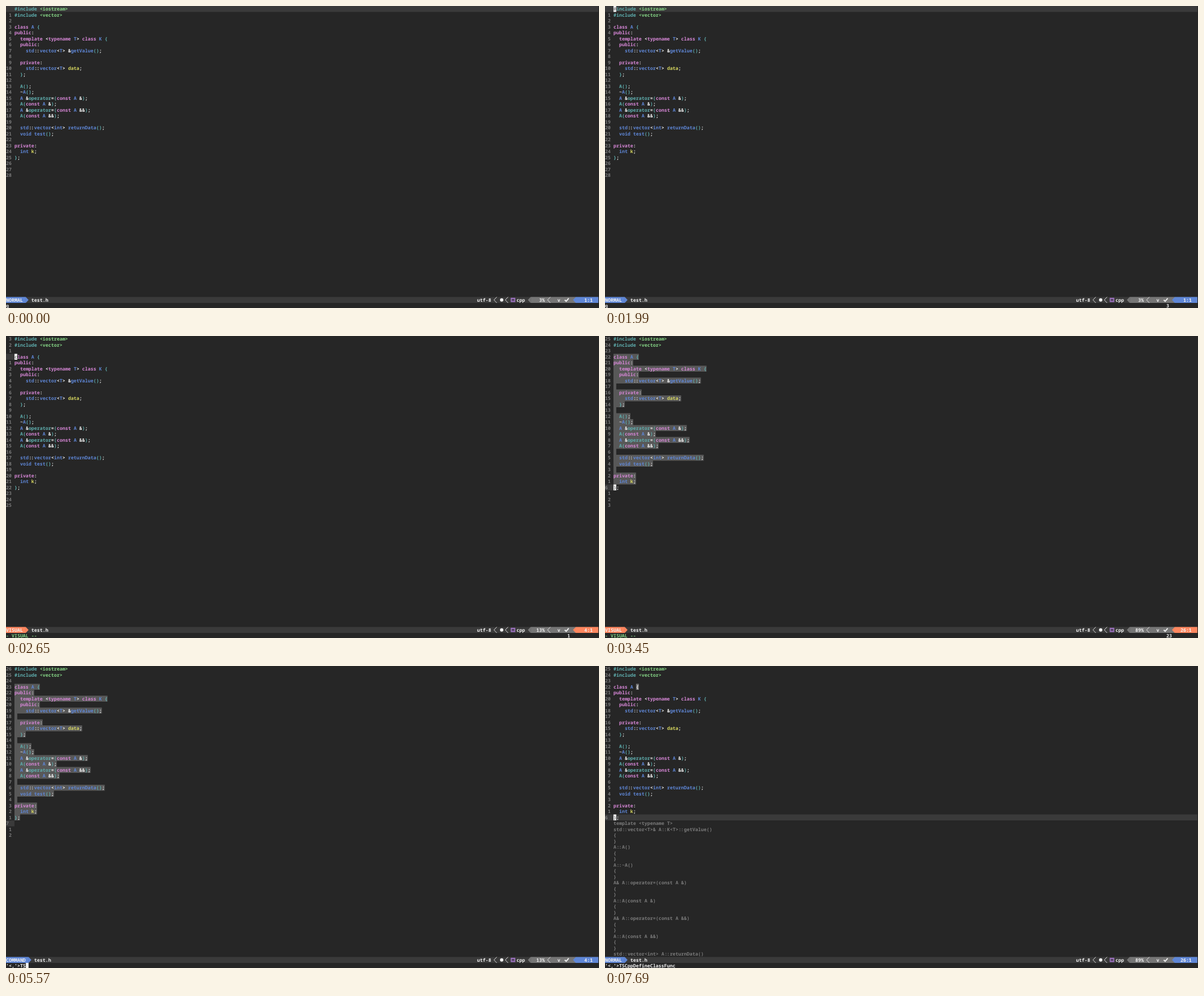
Animation, 1048 px wide and 534 px high, one loop 8000 ms. Source, as an HTML page:

```html
<!DOCTYPE html>
<html lang="en">
<head>
<meta charset="utf-8">
<title>Editor session</title>
<style>
  html, body { margin: 0; width: 100%; height: 100%; overflow: hidden; background: #262626; }
  svg { display: block; width: 1048px; height: 534px; }
  text { font: 600 8.308px "Noto Sans Mono", "DejaVu Sans Mono", monospace; text-rendering: geometricPrecision; font-variant-ligatures: none; }
</style>
</head>
<body>
<svg id="screen" viewBox="0 0 1048 534"></svg>
<script>
const W = 4.985, H = 10.5, COLS = 210, GUTTER = 3, STATUS = 49, CMD = 50, LOOP = 8000;
const C = {
  bg: '#262626', bar: '#3a3a3a', sel: '#585858', grey: '#767676', dim: '#7a7a7a', white: '#f0f0f0',
  blue: '#5f87d7', orange: '#ff875f', green: '#87d787', teal: '#5fafaf', pink: '#d787d7', yellow: '#d7d75f',
  purple: '#a074c4', menu: '#b2b2b2', covered: '#8a8a8a'
};

const source = `#include <iostream>
#include <vector>

class A {
public:
  template <typename T> class K {
  public:
    std::vector<T> &getValue();

  private:
    std::vector<T> data;
  };

  A();
  ~A();
  A &operator=(const A &);
  A(const A &);
  A &operator=(const A &&);
  A(const A &&);

  std::vector<int> returnData();
  void test();

private:
  int k;
};


`.split('\n');

const preview = ['template <typename T>'].concat([
  'std::vector<T>& A::K<T>::getValue()', 'A::A()', 'A::~A()', 'A& A::operator=(const A &)',
  'A::A(const A &)', 'A& A::operator=(const A &&)', 'A::A(const A &&)'
].flatMap(s => [s, '{', '}']), 'std::vector<int> A::returnData()');

const menu = ['TSCppDefineClassFunc', 'TSCppMakeConcreteClass', 'TSCppRuleOf3', 'TSCppRuleOf5'];
const range = "'<,'>";

// Each step overrides part of the state before it.
const steps = [
  [0, { mode: 'NORMAL', row: 0, pos: 0, cursor: false, cmd: 'q', count: '', menu: false, preview: false }],
  [650, { cursor: true }],
  [1910, { count: '3' }],
  [2040, { row: 3, pos: 3, count: '' }],
  [2650, { mode: 'VISUAL', cmd: '- VISUAL --', count: '1' }],
  [3250, { count: '2' }],
  [3350, { count: '22' }],
  [3450, { row: 25, pos: 25, count: '23' }],
  [4780, { row: 26, pos: 26, count: '24' }],
  [5240, { mode: 'COMMAND', pos: 3, cmd: range, count: '' }],
  [5370, { cmd: range + 'T' }],
  [5570, { cmd: range + 'TS' }],
  [5900, { cmd: range + 'TSC' }],
  [6030, { cmd: range + 'TSCp' }],
  [6240, { menu: true }],
  [6300, { cmd: range + menu[0] }],
  [7690, { mode: 'NORMAL', row: 25, pos: 25, menu: false, preview: true }]
];

const screen = document.getElementById('screen');

function add(tag, attrs, content = '') {
  const el = document.createElementNS('http://www.w3.org/2000/svg', tag);
  for (const key in attrs) el.setAttribute(key, attrs[key]);
  el.textContent = content;
  screen.append(el);
}

const box = (col, row, cols, fill, rows = 1) =>
  add('rect', { x: col * W, y: row * H, width: cols * W, height: rows * H, fill });

function put(col, row, str, fill) {
  const tight = str === '::';
  add('text', {
    x: col * W + (tight ? 0.5 : 0), y: row * H + 8.1, fill,
    'letter-spacing': tight ? -1 : 0
  }, str);
}

// A chevron as tall as the status row: filled, or a thin line when fill is 'none'.
function chevron(base, tip, fill) {
  const top = STATUS * H, line = fill === 'none';
  add('path', {
    d: `M${base * W} ${top}L${tip * W} ${top + H / 2}L${base * W} ${top + H}`,
    fill, stroke: line ? C.white : 'none', 'stroke-width': 0.9
  });
}

function tint(token, line, at) {
  if (/^<(iostream|vector)>$/.test(token)) return C.green;
  if (/^(class|public|private|template|typename|const)$/.test(token)) return C.pink;
  if (/^(#include|operator|[(){}])$/.test(token)) return C.teal;
  if (/^(data|k)$/.test(token)) return C.yellow;
  if (at === 2 && line.startsWith('  A(')) return C.teal;
  return /\w/.test(token) ? C.blue : C.white;
}

function code(row, line, fill) {
  for (const m of line.matchAll(/#include|<(?:iostream|vector)>$|\w+|::|[(){}]|[^\s\w(){}:]+|:/g))
    put(GUTTER + m.index, row, m[0], fill || tint(m[0], line, m.index));
}

function block(col, row, char = '') {
  box(col, row, 1, C.white);
  put(col, row, char, C.covered);
}

// One path for all rows, so that no seams show between them.
function drawSelection(from, to) {
  const d = source.slice(from, to).map((line, i) => {
    const width = (line.length || 1) * W;
    return `M${GUTTER * W} ${(from + i) * H}h${width}v${H}h${-width}z`;
  });
  add('path', { d: d.join(''), fill: C.sel });
}

function drawBuffer(s) {
  const normal = s.mode === 'NORMAL';
  const last = s.preview ? 25 : 28;
  box(0, s.row, normal ? COLS : GUTTER, C.bar);
  if (!normal) drawSelection(3, s.row);
  for (let row = 0; row <= last; row++) {
    const away = String(Math.abs(row - s.row));
    // The left edge of the gutter is cut off, so the current number loses a digit.
    if (row === s.row) put(0, row, String(row + 1).slice(1), C.dim);
    else put(2 - away.length, row, away, C.dim);
    code(row, source[row]);
  }
  if (s.preview) {
    preview.forEach((line, i) => code(26 + i, line, C.dim));
    box(GUTTER + 8, 3, 1, C.grey);
    put(GUTTER + 8, 3, '{', C.white);
  }
  if (s.cursor && s.mode !== 'COMMAND') block(GUTTER, s.row, source[s.row][0]);
}

function drawStatus(s) {
  const accent = s.mode === 'VISUAL' ? C.orange : C.blue;
  const end = s.mode.length + 1, y = STATUS * H;
  const percent = Math.floor((s.pos + 1) / source.length * 100) + '%';
  const place = s.pos + 1 + ':1';

  box(0, STATUS, COLS, C.bar);
  box(0, STATUS, end, accent);
  chevron(end, end + 1, accent);
  put(0, STATUS, s.mode, C.white);
  put(end + 2, STATUS, 'test.h', C.white);

  put(167, STATUS, 'utf-8', C.white);
  chevron(174, 173, 'none');
  add('circle', { cx: 876, cy: y + 5.2, r: 3, fill: C.white });
  chevron(178, 177, 'none');
  add('rect', { x: 892, y: y + 1.5, width: 8, height: 7.5, fill: C.purple });
  add('path', { d: `M894.5 ${y + 3}v4.4M897.5 ${y + 3}v4.4M894.5 ${y + 5.2}h3`, stroke: C.bg, fill: 'none' });
  put(181, STATUS, 'cpp', C.white);

  chevron(186, 185, C.grey);
  box(186, STATUS, 16, C.grey);
  put(191 - percent.length, STATUS, percent, C.white);
  chevron(193, 192, 'none');
  put(195.5, STATUS, 'v', C.white);
  add('path', { d: `M987.5 ${y + 5.2}L990 ${y + 7.6}L994.5 ${y + 2.4}`, stroke: C.white, 'stroke-width': 2, fill: 'none' });

  chevron(202, 201, accent);
  box(202, STATUS, 8, accent);
  put(208 - place.length, STATUS, place, C.white);
}

function drawCommand(s) {
  put(0, CMD, s.cmd, s.mode === 'VISUAL' ? C.green : C.white);
  put(199, CMD, s.count, C.white);
  if (s.mode === 'COMMAND') block(s.cmd.length, CMD);
}

function drawMenu() {
  box(4, 46, 24, C.bar, menu.length);
  box(4, 46, 24, C.blue);
  menu.forEach((item, i) => put(5, 46 + i, item, i ? C.menu : C.white));
}

let shown = 0;
function tick(now) {
  const t = now % LOOP;
  const past = steps.filter(([at]) => at <= t);
  if (past.length !== shown) {
    shown = past.length;
    const state = Object.assign({}, ...past.map(step => step[1]));
    screen.replaceChildren();
    drawBuffer(state);
    drawStatus(state);
    drawCommand(state);
    if (state.menu) drawMenu();
  }
  requestAnimationFrame(tick);
}
tick(performance.now());
</script>
</body>
</html>
```
